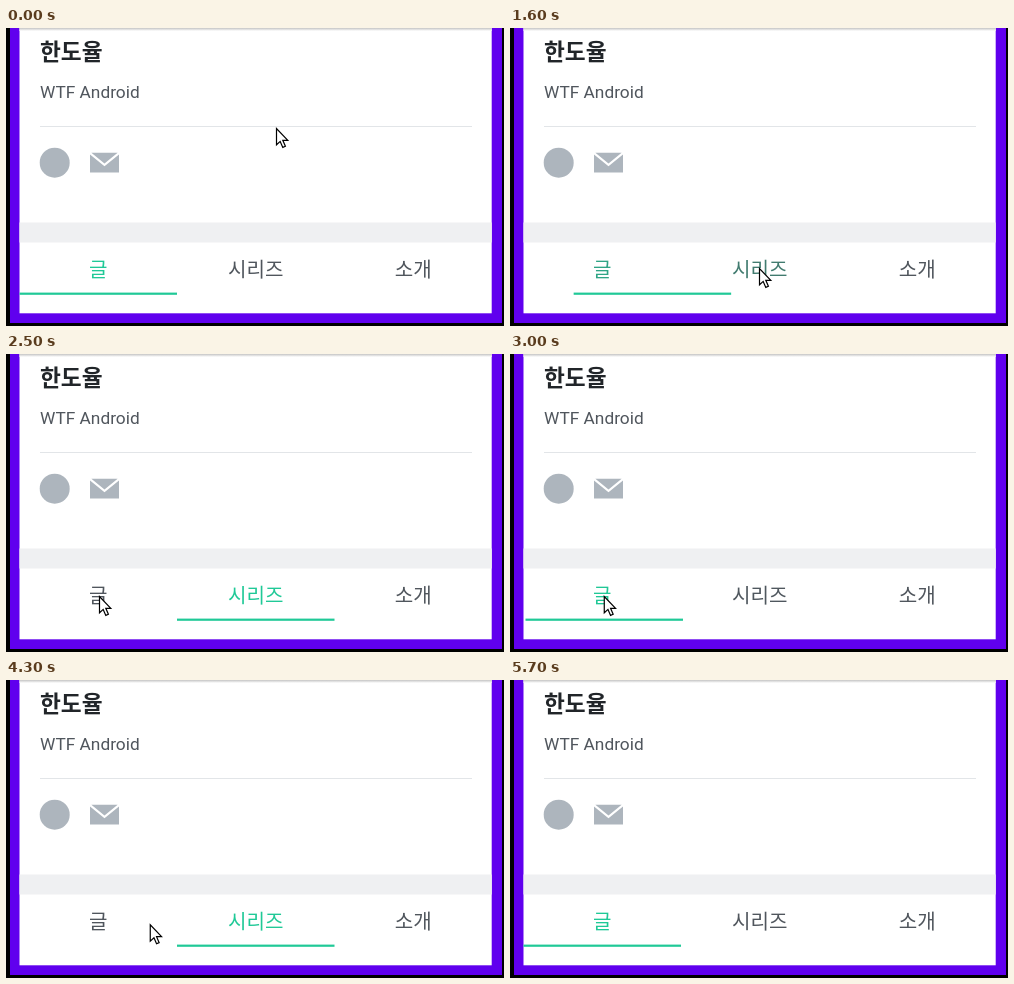
Recreate the animation shown at these times as an HTML page. Size 498 by 298 pixels, loop 6100 ms.

```html
<!DOCTYPE html>
<html lang="ko">
<head>
<meta charset="utf-8">
<title>Profile tabs</title>
<style>
  html, body { margin: 0; width: 100%; height: 100%; overflow: hidden; background: #000; }
  svg { display: block; width: 498px; height: 298px; font-family: Roboto, "Noto Sans CJK KR", "Noto Sans CJK", sans-serif; }
  text { fill: #50565d; }
  .tab { font-size: 20.1px; text-anchor: middle; }
</style>
</head>
<body>
<svg viewBox="0 0 498 298">
  <defs>
    <linearGradient id="shade" x2="0" y2="1">
      <stop stop-color="#c4c4c4"/>
      <stop offset="1" stop-color="#fff"/>
    </linearGradient>
  </defs>
  <rect width="498" height="298"/>
  <rect x="4" width="492" height="295" fill="#6000ee"/>
  <rect x="13.5" width="472.2" height="285.3" fill="#fff"/>
  <rect x="13.5" width="472.2" height="3" fill="url(#shade)"/>

  <text x="34" y="32" font-size="22.7" font-weight="700" style="fill: #212529">한도율</text>
  <text x="34" y="70" font-size="17.3">WTF Android</text>
  <rect x="34" y="98" width="432" height="1" fill="#e2e5e8"/>

  <g fill="#adb5bd">
    <circle cx="48.7" cy="134.7" r="15"/>
    <path transform="translate(84 120.1) scale(.906)" d="M16 16.9 1.5 5h29zM0 7v20h32V7L16 20z"/>
  </g>
  <rect x="13.5" y="194.5" width="472.2" height="20" fill="#eff0f2"/>

  <text class="tab" x="92.3" y="248.9">글</text>
  <text class="tab" x="249.8" y="248.9">시리즈</text>
  <text class="tab" x="407.3" y="248.9">소개</text>
  <rect id="bar" y="264.6" width="157.5" height="2.2" fill="#20c997"/>

  <path id="cursor" d="M.5.5V16.8L4.2 13.4 6.8 19.4 9.4 18.3 6.8 12.3H11.8Z" fill="#fff" stroke="#000" stroke-width="1.2"/>
</svg>
<script>
const LOOP = 6100, STEP = 100, TAB = 157.5;
const GREY = [80, 86, 93], GREEN = [32, 201, 151];
const taps = [1600, 2800, 3800, 4900];

// pointer moves: start, end, x, y
const home = [270, 100];
const moves = [
  [200, 500, 250, 251],
  [700, 900, 249, 240],
  [1830, 2330, 93, 242],
  [2980, 3480, 259, 241],
  [3980, 4500, 87, 246],
  [5000, 5650, 30, -30]
];

const bar = document.getElementById("bar");
const cursor = document.getElementById("cursor");
const tabs = document.querySelectorAll(".tab");

const clamp = u => Math.max(0, Math.min(1, u));
const smooth = u => u * u * (3 - 2 * u);
const lerp = (a, b, k) => a + (b - a) * k;
const tint = k => `rgb(${GREY.map((c, i) => Math.round(lerp(c, GREEN[i], k)))})`;

function pagePosition(t) {
  return taps.reduce((pos, tap, i) => {
    if (t < tap) return pos;
    const eased = 1 - (1 - clamp((t - tap + 29) / 393)) ** 5;
    return i % 2 ? 1 - eased : eased;
  }, 0);
}

function pointer(t) {
  return moves.reduce(([px, py], [start, end, x, y]) => {
    const k = smooth(clamp((t - start) / (end - start)));
    return [lerp(px, x, k), lerp(py, y, k)];
  }, home);
}

function draw(now) {
  // the screen refreshes ten times a second
  const t = Math.floor((now % LOOP) / STEP) * STEP;
  const p = pagePosition(t);
  bar.setAttribute("x", 13.5 + TAB * p);
  tabs[0].style.fill = tint(1 - p);
  tabs[1].style.fill = tint(p);
  cursor.setAttribute("transform", `translate(${pointer(t)})`);
}

const start = performance.now();
function tick() {
  draw(performance.now() - start);
  requestAnimationFrame(tick);
}
tick();
</script>
</body>
</html>
```
